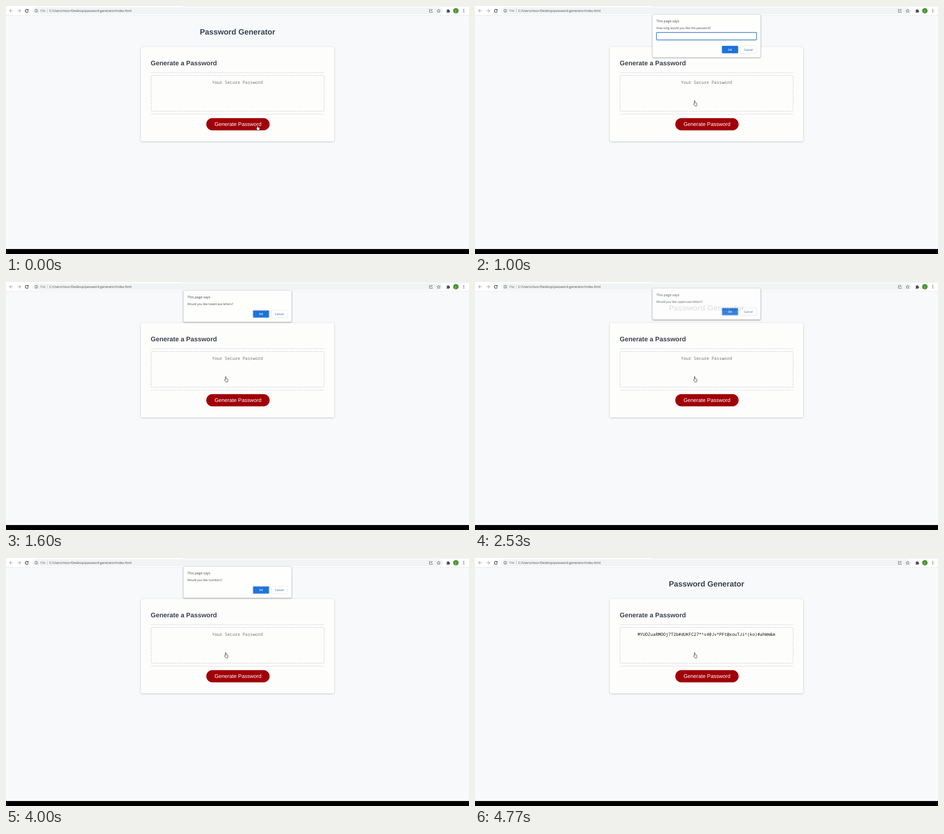
An HTML page that plays this animation: 1023x548 px, repeating every 4.86 s.

```html
<!DOCTYPE html>
<html lang="en">
<head>
<meta charset="utf-8">
<title>Password Generator</title>
<style>
  html, body { margin: 0; width: 100%; height: 100%; overflow: hidden; background: #f7f9fb; }
  svg { display: block; width: 1023px; height: 548px; text-rendering: geometricPrecision; }
  .ui { font-family: "Open Sans", "Noto Sans", sans-serif; font-size: 7px; fill: #3c4043; }
  .page { font-family: "Liberation Sans", Arial, sans-serif; fill: #3a424c; }
  .mono { font-family: "Noto Sans Mono", "DejaVu Sans Mono", monospace; font-size: 9.38px; }
  .bold { font-weight: 700; }
  .mid { text-anchor: middle; }
  .icon { fill: none; stroke: #4a4d51; stroke-width: 1.1; }
  .card { filter: drop-shadow(0 1px 2px rgba(0, 0, 0, .2)); }
  .dialog { filter: drop-shadow(0 1px 1.5px rgba(0, 0, 0, .35)); }
  .button { font-size: 6.2px; font-weight: 600; text-anchor: middle; }
</style>
</head>
<body>
<svg viewBox="0 0 1023 548">
  <rect width="1023" height="548" fill="#f7f9fb"/>
  <rect y="537" width="1023" height="11"/>

  <g class="ui">
    <rect width="1023" height="20" fill="#fff"/>
    <rect x="389" width="634" height="1" fill="#e3e5e9"/>
    <rect y="20" width="1023" height="1" fill="#e8eaee"/>
    <rect x="58" y="3" width="907" height="15" rx="7.5" fill="#f1f3f4"/>
    <g class="icon">
      <path d="M15.5 10.5H8M11.5 7L8 10.5l3.5 3.5M25 10.5h7.5M29 7l3.5 3.5-3.5 3.5" stroke="#a9abad"/>
      <path d="M48.7 8.7A3.3 3.3 0 1 0 49.2 11.5" stroke="#333" stroke-width="1.3"/>
      <path d="M49.8 6.7v3.3h-3.3z" fill="#333" stroke="none"/>
      <circle cx="67" cy="10.5" r="3.3" stroke-width=".8"/>
      <path d="M67 10v2.4M67 8.3v.9" stroke-width=".9"/>
      <path d="M91.5 6.5v8" stroke="#bbb" stroke-width=".8"/>
      <path d="M938 7.5H935.5v6.500h6.500v-2M937.500 11.500q.3-2.900 4-2.900M939.800 6.800l2.200 1.800-2.200 1.800" stroke-width=".8"/>
      <path d="M956 7l1.1 2.400 2.600.3-1.900 1.800.5 2.600-2.300-1.300-2.300 1.300.5-2.600-1.900-1.800 2.600-.3z" stroke-width=".8"/>
      <path d="M973.5 8.500h2a1.300 1.300 0 0 1 2.600 0h1.900v2a1.300 1.300 0 0 1 0 2.600v1.400h-6.500v-2a1.100 1.100 0 0 0 0-2.200z" fill="#4a4d51" stroke="none"/>
    </g>
    <circle cx="994" cy="10.5" r="6" fill="#4b9232"/>
    <text class="mid" x="994" y="12.5" style="fill:#fff">j</text>
    <g fill="#4a4d51">
      <circle cx="1011.5" cy="7.5" r=".9"/><circle cx="1011.5" cy="10.5" r=".9"/><circle cx="1011.5" cy="13.5" r=".9"/>
    </g>
    <text x="76" y="13" style="fill:#6b6f73">File</text>
    <text x="95.5" y="13">C:/Users/nivor/Desktop/password-generator/index.html</text>
  </g>

  <g class="page">
    <text class="bold mid" x="511.5" y="63.3" font-size="17.06">Password Generator</text>
    <rect class="card" x="298" y="90.5" width="427" height="208.5" rx="2.5" fill="#fdfdfc"/>
    <text class="bold" x="319.8" y="130.5" font-size="14.39">Generate a Password</text>
    <path d="M320 147.500H703M320 239H703" stroke="#dedee6"/>
    <rect x="320.500" y="153.500" width="382.500" height="79" rx="2.500" fill="none" stroke="#c4c4d0" stroke-dasharray="3.2 2.1"/>
    <rect x="442.5" y="247.700" width="140" height="27" rx="13.500" fill="#a00007"/>
    <text class="mid" x="512.500" y="265" font-size="11.72" fill="#fff">Generate Password</text>
  </g>
  <text id="field" class="mono mid" x="511.500" y="171.500"></text>

  <g id="dialogs"></g>
  <path id="hand" d="M2 7.500V1.200a.9.9 0 0 1 1.800 0V5l3.300.7q1 .3.900 1.400l-.5 3.200-.6 1.900H3.500L.4 8.300q-.3-.9.500-1.200z"
        fill="#fff" stroke="#222" stroke-width=".85" stroke-linejoin="round"/>
</svg>
<script>
const LOOP = 4860, FADE = 140;
const PASSWORD = "MYUDZuaRMOOj7T2b#dUKFC27*^s40Jv*PFt@xouTJi^(ko)#ahWm&m";
const $ = id => document.getElementById(id);
const clamp = v => Math.max(0, Math.min(1, v));
const ease = p => p * p * (3 - 2 * p);

function dialogMarkup(question, prompt) {
  const top = prompt ? 88 : 62.5;
  const input = `<rect x="401" y="58.5" width="221" height="16.5" rx="1.5" fill="#fff" stroke="#3576c8" stroke-width="1.4"/>
    <text class="typed" x="405" y="69.3"></text>`;
  const ring = `<rect x="546.4" y="63.4" width="34.2" height="14.7" rx="1" fill="none" stroke="#a9c8ee" stroke-width=".6"/>`;
  return `<rect class="dialog" x="392" y="19" width="239" height="${prompt ? 94.5 : 69}" rx="2.5" fill="#fefefd" stroke="#d0d2d6" stroke-width=".6"/>
    <text x="400.8" y="36.3" style="font-size:7.53px">This page says</text>
    <text x="400.8" y="51" style="font-size:6.6px">${question}</text>
    ${prompt ? input : ""}
    <rect x="545.5" y="${top}" width="36" height="16.5" rx="2" fill="#1d72da"/>
    ${prompt ? "" : ring}
    <rect x="586" y="${top}" width="36.5" height="16.5" rx="2" fill="#fff" stroke="#e1e3e8" stroke-width=".8"/>
    <text class="button" x="563.5" y="${top + 10.5}" style="fill:#fff">OK</text>
    <text class="button" x="604" y="${top + 10.5}" style="fill:#4078c0">Cancel</text>`;
}

// question, opening time, closing time
const dialogs = [
  ["How long would you like the password?", 230, 1430],
  ["Would you like lowercase letters?", 1430, 2460],
  ["Would you like uppercase letters?", 2460, 3360],
  ["Would you like numbers?", 3360, 4230],
  ["Would you like special characters?", 4230, 4630]
].map(([question, open, close], i) => {
  const node = document.createElementNS("http://www.w3.org/2000/svg", "g");
  node.setAttribute("class", "ui");
  node.innerHTML = dialogMarkup(question, i === 0);
  $("dialogs").append(node);
  return { node, open, close };
});
const typed = document.querySelector(".typed");

function draw(t) {
  for (const { node, open, close } of dialogs) {
    const rise = clamp((t - open) / FADE), fall = clamp((t - close) / FADE);
    const alpha = fall > 0 ? 1 - fall ** 1.5 : 1 - (1 - rise) ** 1.5;
    node.setAttribute("opacity", alpha);
    node.setAttribute("transform", `translate(0 ${-11 * (1 - rise) - 9 * fall})`);
    node.style.display = alpha > 0 ? "" : "none";
  }
  typed.textContent = "54".slice(0, t < 1130 ? 0 : t < 1240 ? 1 : 2);

  const done = t >= 4680;
  $("field").textContent = done ? PASSWORD : "Your Secure Password";
  $("field").setAttribute("fill", done ? "#151515" : "#767676");

  const move = ease(clamp((t - 400) / 420));
  $("hand").setAttribute("transform", `translate(${552.5 - 70 * move} ${262.7 - 54 * move})`);
}

function tick(now) {
  draw(now % LOOP);
  requestAnimationFrame(tick);
}
draw(0);
requestAnimationFrame(tick);
</script>
</body>
</html>
```
